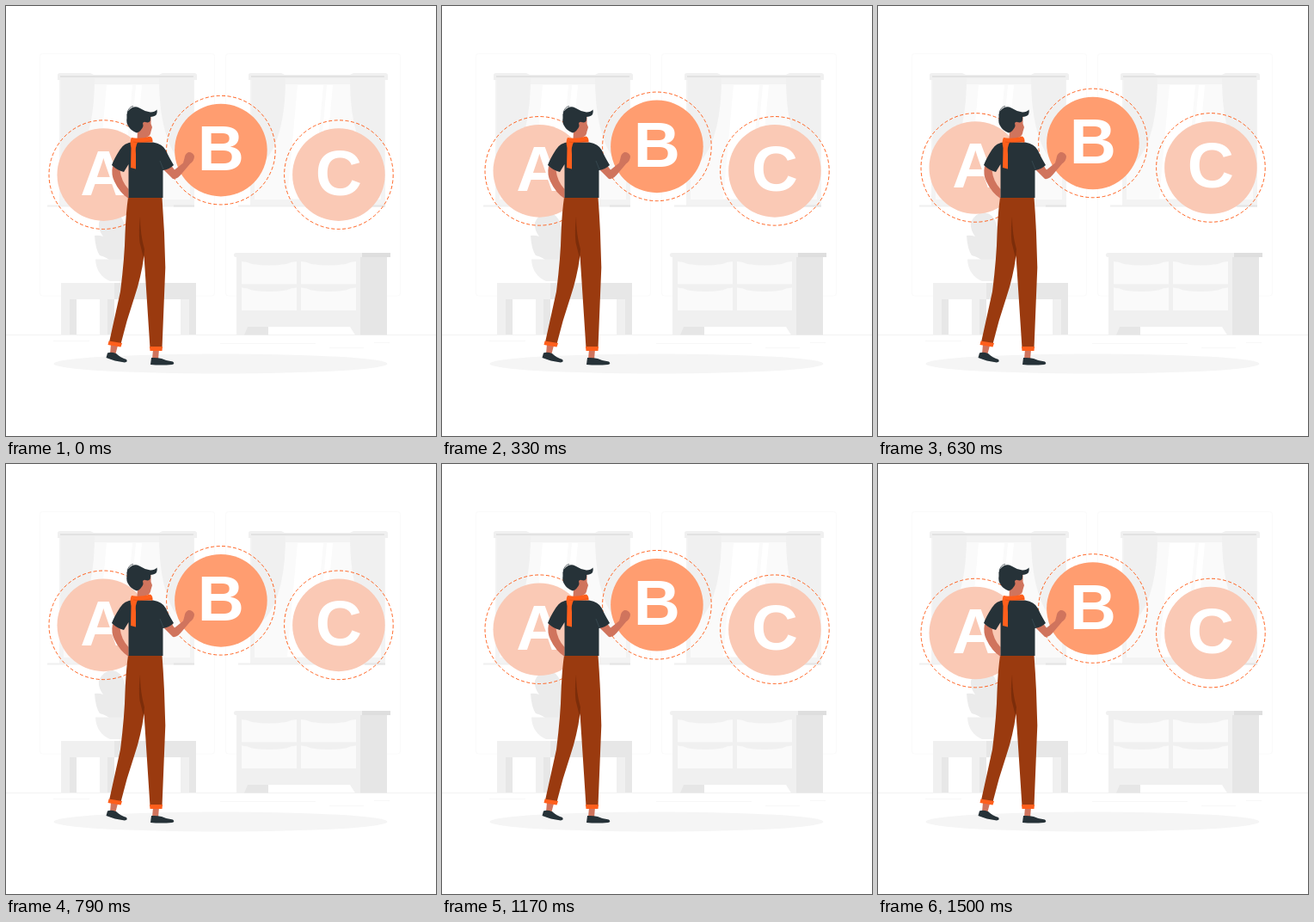
Recreate the animation shown at these times as an HTML page. Size 500x500 px, loop 1.54 s.

```html
<!DOCTYPE html>
<html lang="en">
<head>
<meta charset="utf-8">
<title>Choosing an option</title>
<style>
  html, body { margin: 0; width: 100%; height: 100%; overflow: hidden; background: #fff; }
  svg { display: block; width: 100%; height: 100%; }
  .ring { fill: none; stroke: #ff6422; stroke-width: 1; stroke-dasharray: 4 2.5; }
  .letter { font: bold 75px Arial, "Liberation Sans", sans-serif; fill: #fff; text-anchor: middle; }
  .dark { fill: #263238; }
  .skin { fill: #d0745d; }
  .orange { fill: #ff5f1c; }
</style>
</head>
<body>
<svg viewBox="0 0 500 500">
  <defs>
    <rect id="panel" x="39.500" y="55.500" width="203" height="281.500" rx="3" fill="none" stroke="#fafafa"/>
    <g id="window">
      <rect x="62" y="84" width="157" height="148" fill="#f3f3f3"/>
      <rect x="67" y="91" width="147" height="134" fill="#fafafa"/>
      <path d="M117 92H147L135 224H105ZM151 92H158L146 224H139Z" fill="#fff"/>
      <path d="M64 84H103Q103 125 94 152Q85 180 66 190H64ZM178 84H218V190H215Q196 180 187 152Q178 125 178 84Z" fill="#f0f0f0"/>
      <path d="M60 80Q60 78 63 78H98L102 80H178L182 78H219Q222 78 222 81V86H182L178 84H102L98 86H60Z" fill="#f0f0f0"/>
      <path d="M63 82H218" stroke="#e2e2e2" stroke-width="2"/>
      <path d="M48 232.500H219" stroke="#f0f0f0" stroke-width="2"/>
      <path d="M195 232.500H219" stroke="#e4e4e4" stroke-width="2"/>
    </g>
    <path id="drawer" d="M274 297Q281 297.500 286 300Q306 303 326 300Q331 297.500 338 297V323.500H274Z" fill="#fafafa"/>
  </defs>

  <use href="#panel"/>
  <use href="#panel" x="216"/>
  <use href="#window"/>
  <use href="#window" x="222"/>
  <path d="M0 382.500H500" stroke="#f3f3f3"/>
  <path d="M55 389.500H97M249 392.500H360M376 397.500H416M428 391.500H446" stroke="#f7f7f7"/>

  <g id="plant">
    <path fill="#ebebeb" d="M108 252Q113 240 124 240Q134 242 137 252L144 270V298H124Q117 292 109 290Q104 283 103 267Q108 266 113 268Q107 260 108 252Z"/>
    <path fill="#f0f0f0" d="M104 294.500H160Q160 313 146 320H121Q105 313 104 294.500Z"/>
  </g>

  <g id="desk">
    <path d="M64 322H126V341H118V382H109V341H74V382H64ZM203 341H213V382H203Z" fill="#f0f0f0"/>
    <path d="M74 341H82V382H74ZM118 341H126V382H118ZM126 322H221V382H213V341H126Z" fill="#e7e7e7"/>
  </g>

  <g id="cabinet">
    <path d="M412 292H443V382.500H412Z" fill="#e6e6e6"/>
    <path d="M268 292H412V382.500H406L400 373H305L277 382.500H268Z" fill="#f0f0f0"/>
    <path d="M281 373H305V382.500H277Z" fill="#e6e6e6"/>
    <path d="M267 287H414V292H267Q265 292 265 289.500T267 287Z" fill="#f0f0f0"/>
    <path d="M414 287H447V292H414Z" fill="#dedede"/>
    <use href="#drawer"/>
    <use href="#drawer" x="69"/>
    <use href="#drawer" y="30.500"/>
    <use href="#drawer" x="69" y="30.500"/>
  </g>

  <ellipse cx="249.500" cy="416" rx="194" ry="11.500" fill="#f5f5f5"/>

  <g id="options"></g>

  <g id="person">
    <path class="skin" d="M122 393L121 405L127 406L130 395ZM171 399L170 411L177 411L178 399Z"/>
    <path class="dark" d="M118 403.500Q122 402 128 404Q133 409 140 411Q142 414 138 414.500Q126 413 116.500 409ZM169 409Q175 408.500 181 410Q187 413 194 413.500Q197 416 193 417Q180 418 168 417Z"/>
    <path fill="#9a3a0f" d="M142 222.500H181.500Q184.500 262 185.300 304L181.500 398H167.500L160.500 290Q157 316 149.500 338Q140 366 133.500 393L120 391L133 332Q138 292 138.500 265Q139.500 240 142 222.500Z"/>
    <path fill="#7c2d0a" d="M156 245Q154 262 155.500 275L160 293L161 283Q156 265 156 245Z"/>
    <path class="orange" d="M119.500 389.500L135 392L133.500 396.500L118.500 394ZM167 396H182L181.500 401H167.500Z"/>

    <path class="skin" d="M124 186Q122 196 126 204Q132 217 142.500 224V213Q134 204 132.500 191Z"/>
    <path class="skin" d="M183 190L194 201Q198 202 203 196.500L214 183.500Q219 180 219 174.500Q217 169.500 212 170Q208 172 207.500 177L206 182.500L196 190.500L191 184Z"/>
    <path class="dark" d="M148 158Q137 159 132.500 167Q126 177 123 185Q129 191 137 193L142.500 184V223H182.500V191Q190 190 195 185Q189 175 186 168Q182 160 171 158.500Z"/>
    <path d="M179 180L183 190" stroke="#455a64" stroke-width=".5"/>

    <path class="skin" d="M153 144L152.500 155Q160 157 164 152.500Q168 151 168.500 146L170 141L168.500 137V129H157Z"/>
    <path class="dark" d="M140.500 130Q139 122 147 118Q151 116.500 155 118.500Q161 122.500 168 123.500Q173 123.500 175.500 120.500Q177 127 171 128.500L168 129Q169 134.500 165 135.500Q161 134 160 139Q157 146 152 147.500Q145 145 142.500 140Q139.500 136 140.500 130Z"/>
    <path d="M141 124Q143 117 148 116.500" fill="none" stroke="#263238" stroke-width=".7"/>
    <path class="skin" d="M159 136Q162 133 164 137Q164 141 160 142Z"/>
    <path class="orange" d="M146 153Q156 155 167.500 151.500Q171 153 170.500 158.500H153Q150 164 151 172L151 189.500L145 188L145.500 165Q143.500 157 146 153Z"/>
    <path d="M148 158Q155 160 170 156.500" fill="none" stroke="#dc4b10" stroke-width=".6"/>
  </g>
</svg>

<script>
const LOOP = 1540, HALF = LOOP / 2, PHASE = 35, RISE = 10;
const group = document.getElementById("options");

const option = (letter, x, y, color) => `
  <circle cx="${x}" cy="${y}" r="53.8" fill="${color}"/>
  <circle cx="${x}" cy="${y}" r="63.3" class="ring"/>
  <text x="${x}" y="${y + 23.5}" class="letter">${letter}</text>`;

group.innerHTML =
  option("A", 113.3, 196.6, "#fac9b5") +
  option("B", 249.9, 168.1, "#ff9d70") +
  option("C", 386.9, 196.6, "#fac9b5");

// Linear rise, then linear fall.
function draw(now) {
  const t = (now + PHASE) % LOOP;
  const lift = RISE * (1 - Math.abs(t - HALF) / HALF);
  group.setAttribute("transform", `translate(0 ${-lift})`);
  requestAnimationFrame(draw);
}
draw(performance.now());
</script>
</body>
</html>
```
